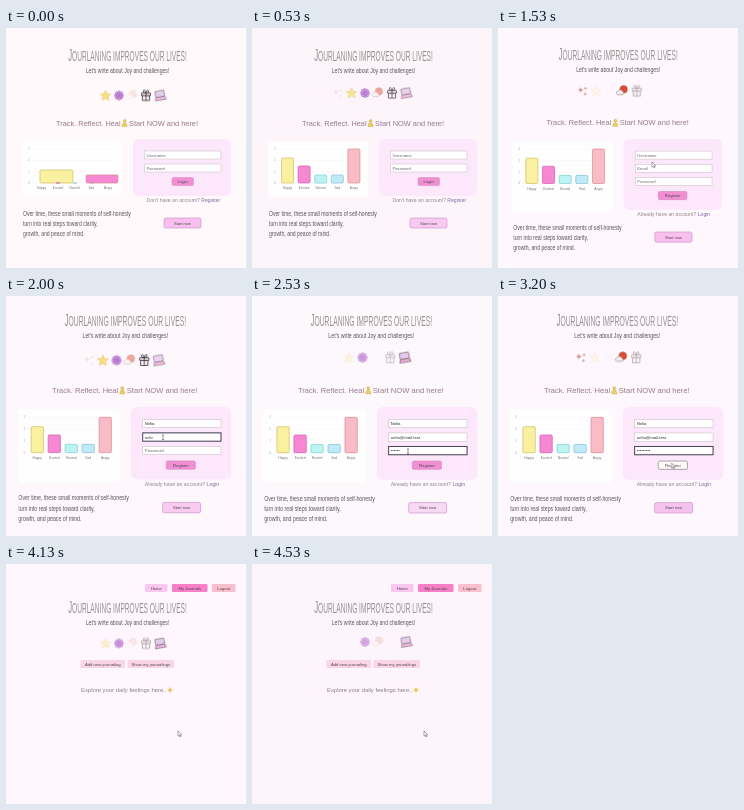
An HTML page for the animation above (4590 ms loop, 240 by 240 pixels).

```html
<!DOCTYPE html>
<html lang="en">
<head>
<meta charset="utf-8">
<title>Journaling</title>
<style>
  html, body { margin: 0; width: 100%; height: 100%; overflow: hidden; }
  body { background: #fef7fd; animation: tint 4.59s linear infinite; }
  svg { display: block; width: 100vw; height: 100vh; }
  text { font-family: "Liberation Sans", Arial, sans-serif; fill: #4d464c; }
  .mid { text-anchor: middle; }
  .title { font-size: 14px; fill: #98908f; }
  .hand { font-size: 6.4px; fill: #5c555a; }
  .lead { font-size: 7.4px; fill: #957b8b; }
  .link { font-size: 5.1px; fill: #8f858d; }
  .small { font-size: 4.2px; }
  .tick { font-size: 3.2px; fill: #77727a; }
  .input { fill: #fff; stroke: #cfc2ca; stroke-width: .6; }
  .hint { font-size: 4.2px; fill: #6d6670; }
  .typed { font-size: 4.2px; fill: #332e33; }
  .focus { fill: none; stroke: #3f3a52; stroke-width: .9; }

  .cam, .home, .dash, .login, .signup, .below, .panel, .card, .cursor, .arrow, .beam,
  .typed, .live, .focus, .start, .submit, .ask {
    animation-duration: 4.59s; animation-iteration-count: infinite; animation-timing-function: step-end;
  }
  .cam { animation-name: zoom; animation-timing-function: ease-in-out; }
  .home { animation-name: home; }
  .dash { animation-name: dash; }
  .login { animation-name: login; }
  .signup { animation-name: signup; }
  .below { animation-name: drop; }
  .panel { animation-name: panel; }
  .card { animation-name: card; }
  .ask { animation-name: ask; }
  .start { animation-name: start; animation-timing-function: linear; }
  .submit { animation-name: submit; }
  .focus { animation-name: focus; }
  .cursor { animation-name: move; animation-timing-function: ease-in-out; }
  .arrow { animation-name: arrow; }
  .beam { animation-name: beam; }
  .typed.name { animation-name: typeName; }
  .typed.mail { animation-name: typeMail; }
  .typed.pass { animation-name: typePass; }
  .live.name { animation-name: hintName; }
  .live.mail { animation-name: hintMail; }
  .live.pass { animation-name: hintPass; }

  @keyframes tint {
    0% { background: #fff9fb } 24.6% { background: #fdf0fc } 33.3% { background: #fef7fd }
    55.1% { background: #fdf8fb } 69.7% { background: #fef7fd } 82.8% { background: #fff8fe }
    100% { background: #fef5fc }
  }
  @keyframes zoom {
    0%, 27% { transform: none }
    33.3% { transform: translate(-1.8px, -1.4px) scale(1.004, 1.012) }
    46%, 100% { transform: translate(-5.3px, -4.5px) scale(1.025, 1.04) }
  }
  @keyframes home { 0% { opacity: 1 } 74%, 100% { opacity: 0 } }
  @keyframes dash { 0% { opacity: 0 } 74%, 100% { opacity: 1 } }
  @keyframes login { 0% { visibility: visible } 27%, 100% { visibility: hidden } }
  @keyframes signup { 0% { visibility: hidden } 27%, 100% { visibility: visible } }
  @keyframes drop { 0% { transform: none } 27%, 100% { transform: translateY(13px) } }
  @keyframes panel { 0% { height: 56px } 27%, 100% { height: 71px } }
  @keyframes card { 0% { height: 57px } 27%, 100% { height: 70px } }
  @keyframes ask { 0% { fill-opacity: 1 } 22%, 100% { fill-opacity: .45 } }
  @keyframes start {
    0%, 33.3% { fill: #f9c0ef } 24.6% { fill: #f8d3f6 } 55.1% { fill: #f8d8f4 } 69.7%, 100% { fill: #f6c3f0 }
  }
  @keyframes submit { 0% { fill: #f08fd2; stroke: #d884c0 } 65.5%, 100% { fill: #fffaf6; stroke: #77717c } }
  @keyframes focus {
    0% { stroke-opacity: 0; y: 123px } 34.5% { stroke-opacity: 1; y: 123px }
    41% { stroke-opacity: 1; y: 136px } 49%, 100% { stroke-opacity: 1; y: 149px }
  }
  @keyframes move {
    0%, 17% { transform: translate(190px, 160px); opacity: 0 }
    20% { transform: translate(180px, 168px); opacity: 1 }
    24.6%, 27% { transform: translate(166px, 171px) }
    33.3% { transform: translate(154px, 134px) }
    35.5%, 40% { transform: translate(156px, 126px) }
    42%, 47.5% { transform: translate(156px, 139px) }
    50%, 60% { transform: translate(155px, 153px) }
    66%, 70% { transform: translate(173.5px, 167px) }
    76%, 100% { transform: translate(172px, 167px); opacity: 1 }
  }
  @keyframes arrow { 0% { opacity: 1 } 35% { opacity: 0 } 60%, 100% { opacity: 1 } }
  @keyframes beam { 0% { opacity: 0 } 35% { opacity: 1 } 60%, 100% { opacity: 0 } }
  @keyframes typeName {
    0%, 34.9% { clip-path: inset(0 100% 0 0); animation-timing-function: steps(5) }
    40.3%, 100% { clip-path: inset(0 0 0 0) }
  }
  @keyframes typeMail {
    0%, 41.4% { clip-path: inset(0 100% 0 0); animation-timing-function: steps(15) }
    48.6%, 100% { clip-path: inset(0 0 0 0) }
  }
  @keyframes typePass {
    0%, 49.7% { clip-path: inset(0 100% 0 0); animation-timing-function: steps(9) }
    57.5%, 100% { clip-path: inset(0 0 0 0) }
  }
  @keyframes hintName { 0% { fill-opacity: 1 } 35.9%, 100% { fill-opacity: 0 } }
  @keyframes hintMail { 0% { fill-opacity: 1 } 41.8%, 100% { fill-opacity: 0 } }
  @keyframes hintPass { 0% { fill-opacity: 1 } 50.5%, 100% { fill-opacity: 0 } }
</style>
</head>
<body>
<svg viewBox="0 0 240 240">
  <defs>
    <g id="head">
      <text class="mid title" transform="translate(121.5 33) scale(.472 1)"><tspan font-size="16.5">J</tspan>OURLANING IMPROVES OUR LIVES!</text>
      <text class="mid hand" transform="translate(121.5 45) scale(.8 1)">Let's write about Joy and challenges!</text>
    </g>
    <path id="spark" d="M0-4Q.5-.5 4 0Q.5.5 0 4Q-.5.5-4 0Q-.5-.5 0-4Z"/>
  </defs>

  <g class="home"><g class="cam">
    <use href="#head"/>
    <g class="icons"></g>

    <text class="lead" x="50" y="97.6">Track. Reflect. Heal</text>
    <g fill="#efd158" stroke="#b9994e" stroke-width=".4">
      <circle cx="118.6" cy="93" r="1.5"/>
      <path d="M116 98.4Q116.3 94.8 118.6 94.8T121.2 98.4Z"/>
    </g>
    <text class="lead" x="123" y="97.6">Start NOW and here!</text>

    <rect class="panel" x="16" y="113" width="100" height="56" rx="4" fill="#fffeff"/>
    <g class="chart"></g>

    <rect class="card" x="127" y="111" width="98" height="57" rx="6" fill="#fce8fa"/>
    <g class="login">
      <rect class="input" x="138.5" y="123" width="76.5" height="8"/>
      <text class="hint" x="140.5" y="128.6">Username</text>
      <rect class="input" x="138.5" y="136" width="76.5" height="8"/>
      <text class="hint" x="140.5" y="141.6">Password</text>
      <rect x="166" y="149.6" width="21.5" height="8" rx="1.5" fill="#f08fd2" stroke="#d884c0" stroke-width=".5"/>
      <text class="mid small" x="176.7" y="155.2">Login</text>
      <text class="link ask" x="140.5" y="173.6">Don't have an account? <tspan fill="#7d6c9c">Register</tspan></text>
    </g>
    <g class="signup">
      <rect class="input" x="138.5" y="123" width="76.5" height="8"/>
      <rect class="input" x="138.5" y="136" width="76.5" height="8"/>
      <rect class="input" x="138.5" y="149" width="76.5" height="8"/>
      <rect class="focus" x="138.5" y="123" width="76.5" height="8"/>
      <text class="hint live name" x="140.5" y="128.6">Username</text>
      <text class="hint live mail" x="140.5" y="141.6">Email</text>
      <text class="hint live pass" x="140.5" y="154.6">Password</text>
      <text class="typed name" x="140.5" y="128.6">Nelia</text>
      <text class="typed mail" x="140.5" y="141.6">nelia@mail.test</text>
      <text class="typed pass" x="140.5" y="154.6">•••••••••</text>
      <rect class="submit" x="161.5" y="163" width="28.5" height="8" rx="1.5" stroke-width=".6"/>
      <text class="mid small" x="175.8" y="168.6">Register</text>
      <text class="link" x="140.5" y="186.8">Already have an account? <tspan fill="#7d6c9c">Login</tspan></text>
    </g>

    <g class="below">
      <text class="hand" transform="translate(17 188) scale(.8 1)">Over time, these small moments of self-honesty</text>
      <text class="hand" transform="translate(17 198) scale(.8 1)">turn into real steps toward clarity,</text>
      <text class="hand" transform="translate(17 207.5) scale(.8 1)">growth, and peace of mind.</text>
      <rect class="start" x="158" y="190" width="37" height="10" rx="1.5" stroke="#c08fc4" stroke-width=".6"/>
      <text class="mid" x="176.5" y="196.6" font-size="4">Start now</text>
    </g>
  </g></g>

  <g class="dash">
    <g transform="translate(0 15.5)"><use href="#head"/><g class="icons"></g></g>
    <g class="nav"></g>
    <text x="75" y="128" font-size="5.9" style="fill:#8a7f8b">Explore your daily feelings here..</text>
    <use href="#spark" transform="translate(164 126) scale(.8)" fill="#f0c35a"/>
  </g>

  <g class="cursor">
    <path class="arrow" d="M0 0V5.2L1.3 4.1L2.2 6L3 5.6L2.2 3.8H3.8Z" fill="#fff" stroke="#55505c" stroke-width=".5"/>
    <path class="beam" d="M0 0H2M1 0V4.6M0 4.6H2" fill="none" stroke="#333" stroke-width=".5"/>
  </g>
</svg>
<script>
  const LOOP = 4590, BEAT = 1680;
  const PHASES = [0, 440, 850, 1130, 1530];
  const LIFT = [0, -2, -4, -5, -4];
  const forever = { duration: LOOP, iterations: Infinity };
  const $ = s => document.querySelector(s);

  function add(parent, tag, attrs, text) {
    const el = document.createElementNS('http://www.w3.org/2000/svg', tag);
    for (const k in attrs) el.setAttribute(k, attrs[k]);
    if (text) el.textContent = text;
    return parent.appendChild(el);
  }

  // Each icon: centre x, opacity at every phase of the beat, drawing.
  const petals = Array.from({ length: 8 }, (_, i) =>
    `<circle cx="${3 * Math.cos(i * Math.PI / 4)}" cy="${3 * Math.sin(i * Math.PI / 4)}" r="1.6"/>`).join('');
  const ICONS = [
    [86, [0, .2, 0, 0, .8], `<g fill="#b9806c"><use href="#spark" transform="translate(-2 -1) scale(.7)"/>
      <use href="#spark" transform="translate(3 -2.5) scale(.45)"/><use href="#spark" transform="translate(2.5 3) scale(.45)"/></g>`],
    [99.5, [.85, .85, .2, 0, .15], `<path d="M0-5.2L1.5-1.7L5.2-1.4L2.4 1.1L3.3 4.8L0 2.8L-3.3 4.8L-2.4 1.1L-5.2-1.4L-1.5-1.7Z"
      fill="#f7dc62" stroke="#d8b04e" stroke-width=".5"/>`],
    [113, [.9, .9, .7, .6, 0], `<g fill="#d583ea" stroke="#8e62a8" stroke-width=".5">${petals}
      <circle r="2" fill="#b06fd0"/></g>`],
    [126.5, [.12, .6, 0, .15, 1], `<circle cx=".4" cy="-1.6" r="3.7" fill="#e0492c" stroke="#7c3a2a" stroke-width=".5"/>
      <path d="M-5.5 3.6a1.9 1.9 0 0 1 .4-3.6a2.6 2.6 0 0 1 4.6.6a1.6 1.6 0 0 1 .3 3Z" fill="#f6eef2" stroke="#7d6c70" stroke-width=".5"/>`],
    [140, [1, 1, .3, 0, .4], `<g fill="#fbeef4" stroke="#3a3438" stroke-width=".8"><path d="M-3.6 0H3.6V5H-3.6Z"/>
      <path d="M-4.5-2.4H4.5V0H-4.5Z"/><path d="M0 5V-2.4Q-4-3-2.6-5T0-2.4Q4-3 2.6-5T0-2.4" fill="none"/></g>`],
    [154, [.8, .7, .9, .8, 0], `<g transform="rotate(-10)" stroke="#5d5364" stroke-width=".7"><rect x="-4.4" y="-4.7" width="9" height="6" rx=".6" fill="#e3c3ea"/>
      <path d="M-4.4 1.5H4.6L5.6 4.6H-5.4Z" fill="#f3a9d4"/></g>`]
  ];

  function pulse(levels) {
    const frames = [];
    for (let start = 0; start < LOOP; start += BEAT)
      PHASES.forEach((p, i) => {
        const offset = (start + p) / LOOP;
        if (offset <= 1) frames.push({ offset, opacity: levels[i], transform: `translateY(${LIFT[i]}px)` });
      });
    frames.push({ ...frames[frames.length - 1], offset: 1 });
    return frames;
  }

  document.querySelectorAll('.icons').forEach(box => ICONS.forEach(([x, levels, art]) => {
    const spot = add(box, 'g', { transform: `translate(${x} 67.5)` });
    const icon = add(spot, 'g');
    icon.innerHTML = art;
    icon.animate(pulse(levels), forever);
  }));

  // Bars: label, height, fill, outline, then opening x, width, height, fill.
  const BASE = 155, chart = $('.chart');
  const BARS = [
    ['Happy', 25, '#f9f0a0', '#cfc060', 34, 33, 13, '#f9f0a0'],
    ['Excited', 17, '#f688d3', '#d25fb0', 50, 4, 0, '#f688d3'],
    ['Neutral', 8, '#bdf4f3', '#7ccfd2', 67, 4, 0, '#bdf4f3'],
    ['Sad', 8, '#c0eaf8', '#7cc0da', 84, 4, 0, '#c0eaf8'],
    ['Angry', 34, '#f9bcc6', '#d98a94', 80, 32, 8, '#f688d3']
  ];
  for (let i = 0; i < 4; i++) {
    const y = BASE - i * 11.3;
    add(chart, 'path', { d: `M26 ${y}H111`, stroke: '#f3edf1', 'stroke-width': .4 });
    add(chart, 'text', { class: 'tick', x: 22, y: y + 1, opacity: .6 }, String(i));
  }
  BARS.forEach(([label, h, fill, stroke, x0, w0, h0, fill0], i) => {
    const x = 29.5 + i * 16.6;
    const bar = add(chart, 'rect', { x, y: BASE - h, width: 12, height: h, rx: 1.2, fill, stroke, 'stroke-width': .7 });
    const pose = (x, w, h, fill) => ({ x: x + 'px', y: BASE - h + 'px', width: w + 'px', height: h + 'px', fill });
    const end = pose(x, 12, h, fill);
    bar.animate([
      { ...pose(x0, w0, h0, fill0), offset: 0, easing: 'ease-out' },
      { ...end, offset: 450 / LOOP },
      { ...end, offset: 1 }
    ], forever);
    add(chart, 'text', { class: 'tick mid', x: x + 6, y: 161 }, label);
  });

  const BUTTONS = [
    [139, 20, 22.5, 'Home', '#f9c6f0'], [166, 20, 35.5, 'My Journals', '#f67fc6'], [206, 20, 23.5, 'Logout', '#f9bfcf'],
    [74.5, 96, 44.5, 'Add new journaling', '#fad5e6'], [121.5, 96, 46.5, 'Show my journalings', '#fad5e6']
  ];
  BUTTONS.forEach(([x, y, w, label, fill]) => {
    add($('.nav'), 'rect', { x, y, width: w, height: 8, rx: 1.2, fill });
    add($('.nav'), 'text', { class: 'small mid', x: x + w / 2, y: y + 5.6 }, label);
  });
</script>
</body>
</html>
```
